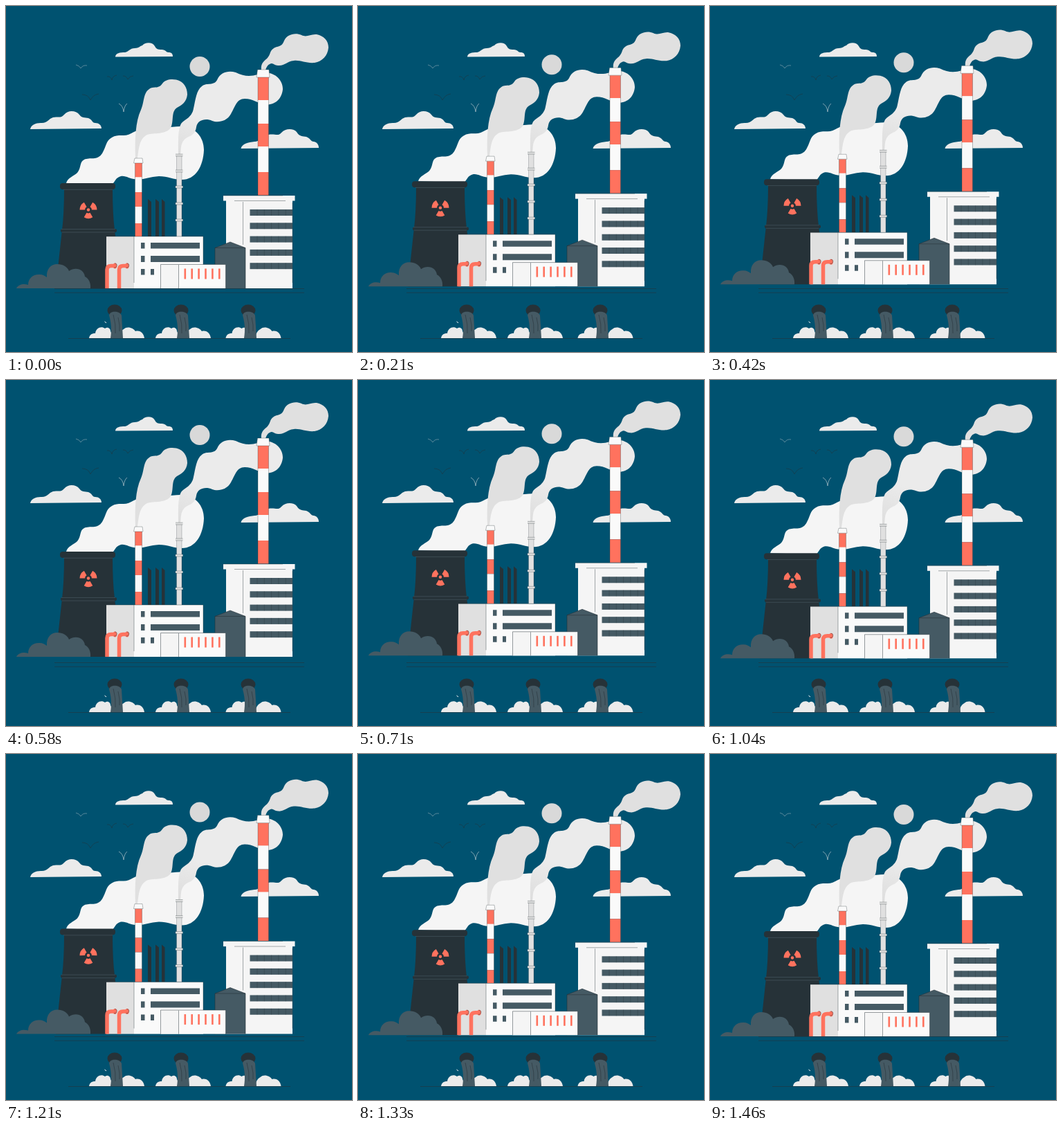
These frames come from a looping animation (500 by 500 pixels, 1500 ms). An HTML page:

```html
<!DOCTYPE html>
<html lang="en">
<head>
<meta charset="utf-8">
<title>Power plant</title>
<style>
  html, body { margin: 0; width: 100%; height: 100%; overflow: hidden; background: #005270; }
  svg { display: block; width: 100%; height: 100%; }
  .white { fill: #fafafa; }
  .pale { fill: #f5f5f5; }
  .light { fill: #ebebeb; }
  .grey { fill: #e0e0e0; }
  .slate { fill: #455a64; }
  .dark { fill: #263238; }
  .coral { fill: #ff725e; }
  .line { fill: none; stroke: #263238; stroke-width: .7; stroke-opacity: .8; }
</style>
</head>
<body>
<svg viewBox="0 0 500 500">
  <defs>
    <linearGradient id="plume" gradientUnits="userSpaceOnUse" x1="250" y1="210" x2="268" y2="155">
      <stop offset="0" stop-color="#dedede"/>
      <stop offset="1" stop-color="#ebebeb"/>
    </linearGradient>
    <g id="flow">
      <ellipse class="dark" cx="157" cy="440" rx="10.5" ry="8.5"/>
      <path class="slate" d="M149 447C150 440 164 440 167 447L169 480H151C153 468 152 458 149 447Z"/>
      <path class="line" d="M155 446Q159 460 158 473M162 450Q165 462 164 470"/>
    </g>
    <g id="foam" class="light">
      <path d="M120 480C121 474 125 473 129 473C130 465 138 462 143 466C147 463 151 466 151 470C153 473 153 477 152 480Z"/>
      <path d="M163 480C163 474 166 469 170 467C175 462 184 465 187 470C194 468 199 473 200 480Z"/>
    </g>
  </defs>

  <rect width="500" height="500" fill="#005270"/>
  <g class="light">
    <path d="M158 73.5C158 68 165 67 172 67C177 66 179 61 186 61C192 61 193 58 197 57C200 53 211 51 215 58C217 62 219 63 225 63C231 63 231 67 235 67C239 67 241 69 241 73Z"/>
    <path d="M35 178C36 172 43 169 50 169C60 170 61 163 68 161C74 159 79 163 84 157C90 150 101 151 106 157C109 162 114 161 119 162C125 164 124 169 129 169C134 169 138 172 138 177Z"/>
    <path d="M339.500 206C341 199 350 197 359 196C367 196 370 188 379 186C389 184 393 189 398 183C404 176 416 177 420 182C424 189 429 188 434 189C440 191 440 196 445 196C450 197 452 201 452 205Z"/>
  </g>
  <g fill="none" stroke-width=".7">
    <path stroke="#7f9fac" d="M101 85Q106 86 108 90Q111 85 117 86"/>
    <path stroke="#b5c5cc" d="M163 141Q169 144 170 153Q171 144 175 141"/>
    <path stroke="#263238" stroke-opacity=".7" d="M146 102Q151 101 153 107Q154 101 160 100M169 101Q174 101 176 106Q179 101 184 101M110 128Q119 128 122 136Q126 128 134 127"/>
  </g>

  <path class="line" d="M70 408.500H431M70 414.300H431M90 480.500H411"/>
  <use href="#foam"/><use href="#foam" x="96"/><use href="#foam" x="197.500"/>
  <use href="#flow"/><use href="#flow" x="96"/><use href="#flow" x="193"/>
  <path fill="none" stroke="#fafafa" d="M142.500 456l2.500 2"/>

  <g id="plant">
    <circle cx="280" cy="87.500" r="14.500" fill="#d9d9d9"/>

    <path class="pale" d="M87 256C89 248 98 246 103 241C109 234 106 225 113 222C121 218 132 224 139 213C145 203 144 195 153 190C162 184 171 190 181 184C196 175 222 176 252 174C274 174 286 190 286 208C285 232 274 251 254 251C242 251 234 246 221 246C207 247 201 251 188 250.500C178 250 174 245 166 246C158 248 158 254 153 258Z"/>
    <path class="grey" d="M187 220C186 193 187 167 195 150C200 139 198 126 207 120C213 115 220 121 226 112C230 106 239 105 246 106.500C257 109 262 118 262 128C261 139 254 143 247 147C238 153 243 167 238 176C231 186 214 183 204 186C192 192 192 207 190 220Z"/>
    <path fill="url(#plume)" d="M249 214C249 196 248 179 253 170C258 164 269 161 271 148C274 135 275 122 283 116C290 110 300 116 305 107C310 95 322 93 332 96C344 102 353 102 364 99C383 91 400 104 400 120C399 133 390 143 376 142.500C364 141 357 134 345 134C333 134 331 146 325 156C319 167 306 169 298 166C289 162 277 164 275 175C273 189 263 187 257 194C252 200 253 207 252 214Z"/>
    <path class="grey" d="M369 93C368 84 371 81 377 76C383 70 380 66 387 61C394 57 398 60 402 50C406 41 418 38 427 42C435 46 440 40 449 41C459 43 466 50 466 60C465 72 457 80 446 82C433 83 426 78 416 79C405 80 403 87 393 86C387 86 386 81 381 84C377 86 376 90 375 93Z"/>

    <path class="dark" d="M84 264H154Q154 300 157 324Q163 370 166 408H72Q77 360 81 324Q84 300 84 264Z"/>
    <rect class="dark" x="78" y="256" width="80" height="9" rx="4"/>
    <rect class="dark" x="79" y="322" width="81" height="5" rx="2.500"/>
    <path fill="none" stroke="#50636c" stroke-width=".5" d="M83 265.300H154M80 322.500H158M81 327H157"/>
    <g id="trefoil" class="coral"><circle cx="119" cy="294.500" r="2.200"/></g>

    <path class="dark" d="M205 333V279L210 283V333ZM216 333V279L221 283V333ZM225 333V279L229.500 283V333Z"/>

    <g id="stacks"></g>
    <rect class="grey" x="246.500" y="214" width="7.500" height="119"/>
    <path class="line" style="stroke-width:.3" d="M246.500 214V333M254 214V333"/>
    <g id="rings"></g>

    <path class="pale" d="M318 280H414V408H318Z"/>
    <rect class="pale" x="314" y="274" width="103.500" height="7.500"/>
    <path class="line" d="M342.500 283V345M314 274H400M330 281.500H404M414 284V400" style="stroke-width:.5"/>
    <g id="floors"></g>

    <path class="slate" d="M302 408V349.500L324 341L346 349.500V408Z"/>
    <path class="line" d="M302 349.500H346M302 349.500L324 341L346 349.500V408M302 349.500V408"/>

    <rect class="grey" x="145" y="333" width="40" height="75"/>
    <rect class="white" x="185" y="333" width="100" height="75"/>
    <path class="line" d="M145 333H285V374M185 333V400" style="stroke-width:.5"/>
    <path class="slate" d="M195 342H200.500V350.500H195ZM195 361H200.500V370H195ZM195 380H200.500V388.500H195ZM209 380H214V388.500H209ZM209 342H280V350.500H209ZM209 361H280V370H209Z"/>
    <rect class="pale" x="223.500" y="373.500" width="26" height="34.500"/>
    <rect class="white" x="249.500" y="373.500" width="68" height="34.500"/>
    <path class="line" d="M223.500 408V373.500H317.500V408M249.500 374V408" style="stroke-width:.6"/>
    <g id="vents"></g>
    <g id="pipes"></g>

    <path class="slate" d="M15 408C18 402 26 401 32 403C32 393 40 387 49 388C53 388 56 390 59 392C58 380 65 373 74 373C82 373 89 377 91 383C101 376 113 381 114 391C119 393 123 400 122 408Z"/>
  </g>
</svg>
<script>
  const NS = "http://www.w3.org/2000/svg";
  const byId = id => document.getElementById(id);

  function add(parent, tag, attrs) {
    const node = document.createElementNS(NS, tag);
    for (const key in attrs) node.setAttribute(key, attrs[key]);
    byId(parent).appendChild(node);
  }
  const rect = (parent, cls, x, y, width, height) =>
    add(parent, "rect", { class: cls, x, y, width, height });
  const line = (parent, d, width = .4) =>
    add(parent, "path", { class: "line", d, style: `stroke-width:${width}` });

  // Striped chimney: edges lists the stripe boundaries from top to bottom.
  function stack(x, w, top, edges) {
    for (let i = 0; i < edges.length - 1; i++)
      rect("stacks", i % 2 ? "white" : "coral", x, edges[i], w, edges[i + 1] - edges[i]);
    const bottom = edges[edges.length - 1];
    line("stacks", `M${x} ${edges[0]}V${bottom}M${x + w} ${edges[0]}V${bottom}`);
    const cap = `M${x - .5} ${top}H${x + w + .5}L${x + w + 1.5} ${edges[0]}H${x - 2}Z`;
    add("stacks", "path", { class: "white", d: cap });
    line("stacks", cap);
  }
  stack(186.5, 10, 220, [227, 247.5, 269, 290, 314, 333]);
  stack(364, 15.5, 92, [103, 136, 170, 203, 240, 273.5]);

  for (const y of [214, 237, 260, 284, 308]) {
    rect("rings", "grey", 245, y, 10.5, 3);
    line("rings", `M245 ${y}H255.500M245 ${y + 3}H255.500`);
  }

  for (let i = 0; i < 5; i++) {
    const y = 294 + i * 19.3;
    rect("floors", "slate", 352.5, y, 61.5, 9);
    for (let x = 363; x < 410; x += 10.3) line("floors", `M${x} ${y}v9`);
  }

  for (let i = 0; i < 6; i++) rect("vents", "coral", 257.5 + i * 9.9, 379.5, 2.6, 15);

  for (const x of [146, 163.5]) {
    add("pipes", "path", {
      d: `M${x} 408V381Q${x} 375.500 ${x + 6} 375.500H${x + 12}`,
      fill: "none", stroke: "#ff725e", "stroke-width": 5.5
    });
    add("pipes", "ellipse", { class: "coral", cx: x + 11.5, cy: 375.5, rx: 2.8, ry: 4 });
    line("pipes", `M${x + 11} 372q4 0 3 4q-1 3 -4 2`, .6);
  }

  for (const angle of [0, 120, 240])
    add("trefoil", "path", {
      d: "M116.500 298.800L112.700 305.300A12.500 12.500 0 0 0 125.300 305.300L121.500 298.800A5 5 0 0 1 116.500 298.800Z",
      transform: `rotate(${angle} 119 294.500)`
    });

  // Plant and sun rise 10 units and sink back at 24 steps a second.
  const LOOP = 1500, STEPS = 36, RISE = 10;
  const plant = byId("plant");
  const start = performance.now();

  function draw(now) {
    const time = Math.max(0, now - start) % LOOP;
    const step = Math.floor((time + 3) * STEPS / LOOP) % STEPS;
    const lift = RISE * (1 - Math.abs(step * 2 / (STEPS - 1) - 1));
    plant.setAttribute("transform", `translate(0 ${-lift.toFixed(2)})`);
    requestAnimationFrame(draw);
  }
  draw(start);
</script>
</body>
</html>
```
